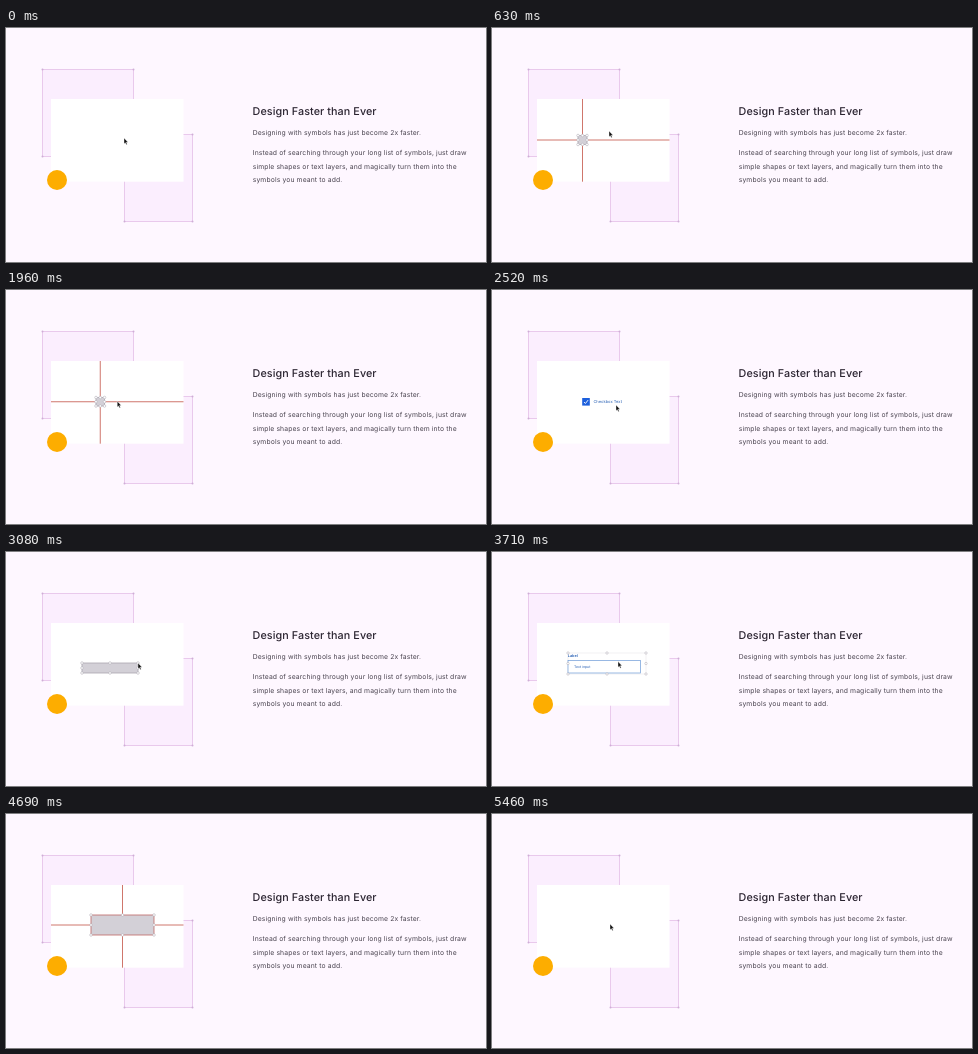
Recreate the animation shown at these times as an HTML page. Size 480x234 px, loop 5600 ms.

```html
<!DOCTYPE html>
<html lang="en">
<head>
<meta charset="utf-8">
<title>Design Faster than Ever</title>
<style>
  html, body { margin: 0; width: 100%; height: 100%; overflow: hidden; background: #fef7ff; }
  svg { display: block; width: 480px; height: 234px; font-family: Inter, sans-serif; text-rendering: geometricPrecision; }
  .frame { fill: #fbeefe; stroke: #e9c9ec; }
  .dot { fill: #cfaed6; }
  .title { font-size: 10.75px; font-weight: 500; fill: #2a2330; letter-spacing: .09px; }
  .body { font-size: 6.8px; fill: #49434f; letter-spacing: .12px; }
  .guide { stroke: #cf766c; }
  .handle { fill: #fff; stroke: #aaa6b0; stroke-width: .5; }
  .shape { fill: #d3d0d7; stroke: #aaa6b0; stroke-width: .8; }
  .shape.wide { stroke: #bd6665; }
  .outline { fill: none; stroke: #dedce2; stroke-width: .4; }
  .field { fill: #fff; stroke: #6d9bd8; stroke-width: .7; }
  .blue { fill: #1c5fdc; }
  .tick { fill: none; stroke: #fff; stroke-width: .9; }
  .label { fill: #2860b4; }
</style>
</head>
<body>
<svg viewBox="0 0 480 234">
  <g id="frames"></g>
  <rect x="45" y="71" width="132.5" height="82.7" fill="#fff"/>
  <g id="art"></g>
  <circle cx="51" cy="152" r="10" fill="#fdad00"/>
  <path id="cursor" d="M0 0V5.8L1.3 4.7L2.3 6.7L3.2 6.2L2.3 4.3H4Z" fill="#111" stroke="#fff" stroke-width=".4"/>
  <text class="title" x="246.6" y="87">Design Faster than Ever</text>
  <g class="body">
    <text x="246.7" y="107">Designing with symbols has just become 2x faster.</text>
    <text x="246.7" y="127.4">Instead of searching through your long list of symbols, just draw</text>
    <text x="246.7" y="140.7">simple shapes or text layers, and magically turn them into the</text>
    <text x="246.7" y="154">symbols you meant to add.</text>
  </g>
</svg>
<script>
const LOOP = 5600, STEP = 70, MOVE = 140;
const $ = id => document.getElementById(id);

const rect = (x, y, w, h, cls) => `<rect x="${x}" y="${y}" width="${w}" height="${h}" class="${cls}"/>`;
const text = (x, y, size, str, attrs) => `<text x="${x}" y="${y}" font-size="${size}" ${attrs}>${str}</text>`;
const line = (x1, y1, x2, y2) => `<path class="guide" d="M${x1} ${y1}L${x2} ${y2}"/>`;

// Circles on the corners of a box, and on the middles of its sides if wanted
function dots(x, y, w, h, r, cls, places = [0, .5, 1]) {
  let out = '';
  for (const u of places) for (const v of places)
    if (u !== .5 || v !== .5) out += `<circle class="${cls}" cx="${x + u * w}" cy="${y + v * h}" r="${r}"/>`;
  return out;
}

function guides(x, y, w, h) {
  const cx = x + w / 2, cy = y + h / 2;
  return line(cx, 71, cx, y) + line(cx, y + h, cx, 153.7) + line(45, cy, x, cy) + line(x + w, cy, 177.5, cy);
}

const box = (x, y) => rect(x, y, 7.6, 7.6, 'blue') + `<path class="tick" d="M${x + 1.8} ${y + 4}l1.4 1.5l2.7-3.4"/>`;
const checkbox = () => box(90.2, 108) + text(101.4, 113.4, 4.05, 'Checkbox Text', 'class="label"');
const input = () => rect(76, 101, 78, 21, 'outline') +
  text(75.8, 104.6, 3.8, 'Label', 'class="label" font-weight="600"') +
  rect(76, 108.5, 72.5, 12.5, 'field') +
  text(82, 115.9, 3.5, 'Text input', 'class="label"') +
  dots(76, 101, 78, 21, 1.2, 'handle');
const button = () => rect(85, 101, 63, 20, 'blue') +
  text(116.5, 113, 4.6, 'Button', 'fill="#fff" text-anchor="middle"');

// Each shape is dragged out from start to drawn, becomes a symbol at turn and is gone at end
const scenes = [
  { start: 280, drawn: 490, turn: 770, end: 1540, area: [86, 107.5, 9, 9], rest: [117, 103], symbol: () => box(86.7, 108) },
  { start: 1575, drawn: 1890, turn: 2240, end: 2660, area: [90, 107.5, 8.5, 8.5], rest: [124, 115], symbol: checkbox },
  { start: 2800, drawn: 3150, turn: 3360, end: 4060, area: [76, 108.5, 70, 12.5], rest: [126, 109.5], symbol: input, free: true },
  { start: 4200, drawn: 4480, turn: 4830, end: 5320, area: [85, 101, 63, 20], rest: [118, 110], symbol: button, hidden: true }
];

// The cursor comes to the lower left corner, drags to the upper right one and moves aside
const home = scenes.at(-1).rest;
const path = [[0, home], ...scenes.flatMap(({ start, drawn, area: [x, y, w, h], rest }, i) => [
  [start - MOVE, i ? scenes[i - 1].rest : home],
  [start, [x, y + h]],
  [drawn, [x + w, y]],
  [drawn + MOVE, rest]
]), [LOOP, home]];

function cursorAt(t) {
  const i = path.findIndex(p => p[0] > t);
  const [t0, from] = path[i - 1], [t1, to] = path[i];
  return from.map((v, n) => v + (to[n] - v) * (t - t0) / (t1 - t0));
}

function drawing(s, t) {
  const [x, y, w, h] = s.area;
  const k = Math.min(1, (t - s.start) / (s.drawn - s.start));
  const now = [x, y + h * (1 - k), w * k, h * k];
  const aligned = k === 1 && !s.free;
  return (aligned ? guides(...now) : '') +
    rect(...now, aligned && w > h ? 'shape wide' : 'shape') + dots(...now, 1.3, 'handle');
}

function render(now) {
  const t = Math.floor(now % LOOP / STEP) * STEP;
  const s = scenes.find(s => t >= s.start && t < s.end);
  $('art').innerHTML = !s ? '' : t < s.turn ? drawing(s, t) : s.symbol();
  $('cursor').setAttribute('transform', `translate(${cursorAt(t)})`);
  $('cursor').setAttribute('visibility', s?.hidden && t < s.turn ? 'hidden' : 'visible');
}

$('frames').innerHTML = [[36.5, 41.5, 91, 87], [118.5, 106.5, 68, 87]]
  .map(f => rect(...f, 'frame') + dots(...f, 1, 'dot', [0, 1])).join('');

const start = performance.now();
(function tick() {
  render(performance.now() - start);
  requestAnimationFrame(tick);
})();
</script>
</body>
</html>
```
